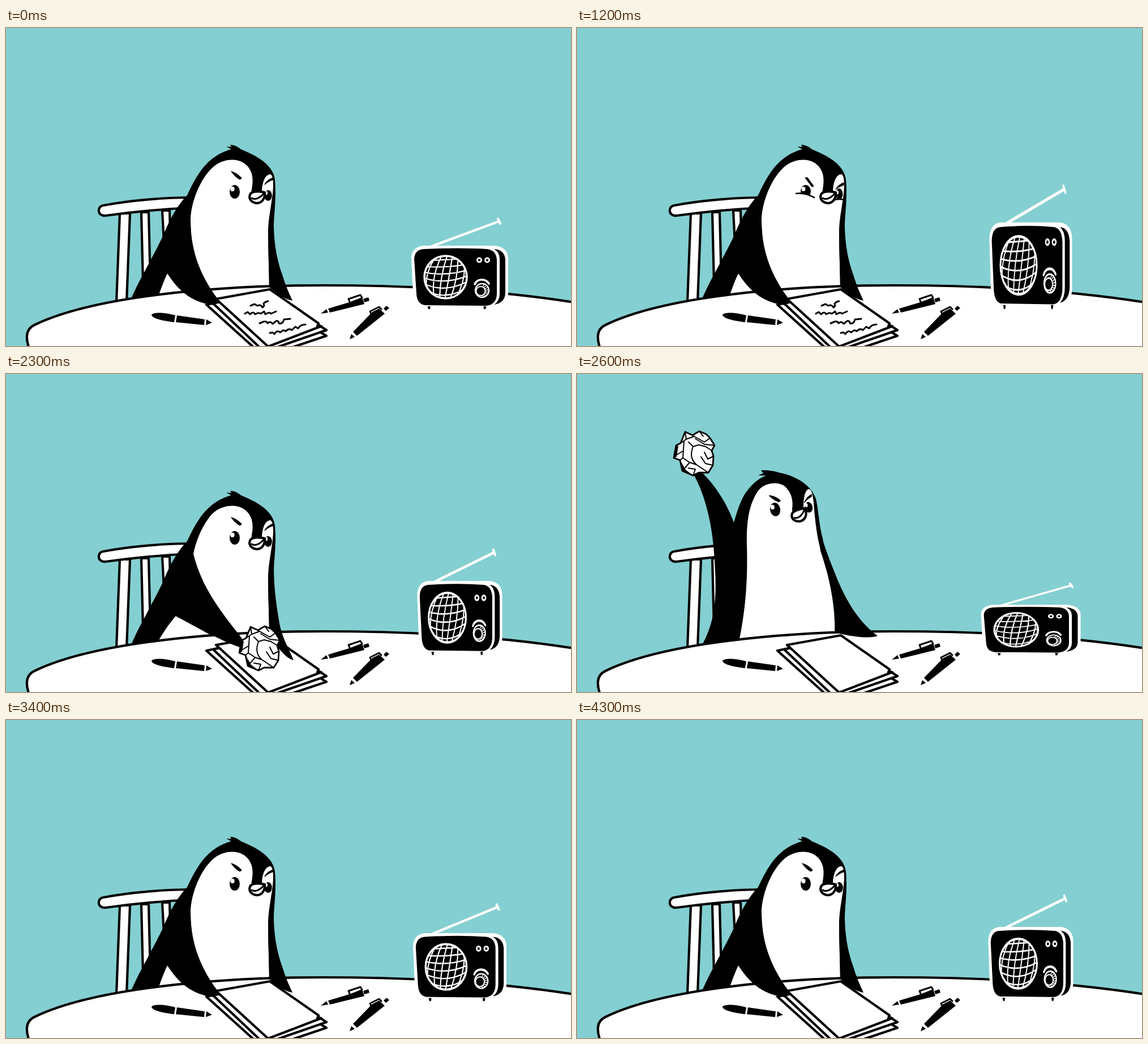
An HTML page for the animation above (4.4 s loop, 998 by 561 pixels).

```html
<!DOCTYPE html>
<html lang="en">
<head>
<meta charset="utf-8">
<title>Penguin at the table</title>
<style>
html, body { margin: 0; width: 100%; height: 100%; overflow: hidden; background: #84cfd1; }
svg { display: block; width: 100%; height: 100%; stroke-width: 4.2px; }
.line { fill: none; stroke: #000; stroke-linecap: round; stroke-linejoin: round; }
.sheet { fill: #fff; stroke: #000; stroke-linejoin: round; }
.white { fill: none; stroke: #fff; stroke-linecap: round; }
.brow { stroke: #000; stroke-width: 1.2px; stroke-linejoin: round; }
</style>
</head>
<body>
<svg viewBox="0 0 998 561">
  <defs>
    <clipPath id="speaker"><circle r="37"/></clipPath>
  </defs>
  <rect width="998" height="561" fill="#84cfd1"/>

  <g class="sheet">
    <path d="M276 322L280 400H291L289 322Z"/>
    <path d="M239 325L242 450H255L252 325Z"/>
    <path d="M201 327L195 484H213L219 327Z"/>
    <path d="M172 313C220 304 280 299 330 299V317C280 319 220 325 176 331C160 332 161 314 172 313Z"/>
  </g>

  <path id="body"/>
  <path id="gap" fill="#fff"/>
  <path id="belly" fill="#fff"/>
  <path id="arm"/>
  <g id="eyes">
    <g id="open">
      <ellipse cx="404" cy="289" rx="9" ry="12"/>
      <ellipse cx="400" cy="284" rx="3.6" ry="4.2" fill="#fff"/>
      <ellipse cx="463" cy="295.500" rx="6.800" ry="9.500"/>
      <ellipse cx="459.500" cy="291" rx="2.600" ry="3.600" fill="#fff"/>
      <path id="brows" class="brow" d="M398 253Q408 256 416 265L413 267Q405 263 398 253ZM457 276Q462 267 472 264L471 268Q464 270 457 276Z"/>
    </g>
    <g id="squint">
      <ellipse cx="404" cy="288" rx="9" ry="11"/>
      <ellipse cx="400" cy="284" rx="3.400" ry="4" fill="#fff"/>
      <ellipse cx="463" cy="293" rx="6.500" ry="10"/>
      <ellipse cx="459.500" cy="290" rx="2.600" ry="3.400" fill="#fff"/>
      <path d="M387 292Q403 290 419 299L414 308H388Z" fill="#fff"/>
      <path d="M456 302Q464 301 470 302L468 308H456Z" fill="#fff"/>
      <path class="line" stroke-width="2.6" d="M387 292Q403 290 419 299M456 303Q464 301 471 303"/>
      <path class="brow" d="M403 264L407 264L418 279L415 280ZM457 284Q463 276 471 273L471 277Q463 280 457 284Z"/>
    </g>
  </g>
  <g id="beak">
    <path d="M431 294C433 288 446 287 457 290C458 299 453 309 443 309C434 308 428 302 431 294Z" class="sheet"/>
    <path class="line" stroke-width="3" d="M434 300C440 304 449 300 456 291"/>
  </g>

  <path class="sheet" d="M42 568C34 548 34 532 50 524C150 475 360 454 560 454C740 454 890 466 1004 484V570Z"/>
  <path d="M257 506C262 500 285 503 299 507L297 519C280 517 258 513 257 506ZM302 507L351 514L350 524L300 519ZM354 514L364 520L353 524Z"/>
  <g id="pens">
    <path d="M556 504L566 496L569 502ZM569 495L606 484L629 475L633 487L572 502ZM631 478L640 475L642 481L633 484Z"/>
    <path class="line" stroke-width="3" d="M607 483L605 478L626 471L629 476"/>
    <path d="M607 549L610 540L616 545ZM613 536L647 501L659 495L669 504L620 543ZM667 495L672 490L677 494L671 499Z"/>
    <path class="line" stroke-width="3" d="M645 505L643 500L659 492L663 496"/>
  </g>

  <g class="sheet">
    <path d="M354 488L440 470L566 543L456 580Z"/>
    <path d="M366 486L460 463L566 533L456 571Z"/>
    <path d="M371 478L466 461L552 521L550 526L557 526L463 562Z"/>
  </g>
  <path id="writing" class="line" stroke-width="3" d="M432 490L439 487L444 490Q450 487 453 493Q457 491 455 486Q459 482 463 482M422 504L427 501L431 505Q437 499 440 505Q446 501 450 504L456 500L458 505Q466 500 468 504L477 500M448 521L455 518Q461 517 462 521Q467 516 471 522L477 517Q482 516 482 521Q489 523 491 514Q496 514 502 513M466 538L471 537L474 540Q479 532 484 537L490 533L494 535Q500 529 505 533L511 527L516 530Q520 523 529 523"/>
  <path id="left"/>
  <path id="right"/>

  <g id="crumple">
    <path class="sheet" stroke-width="3" d="M410 454L425 459L437 447L453 459L472 442L477 457L494 460L487 473L497 478L478 493L485 513L466 518L455 506L432 513L411 531L414 512L388 497L412 488L425 480Z"/>
    <path class="line" stroke-width="2.2" d="M410 454L438 476L437 447L450 471L472 442L465 474L494 460M425 459L430 484L388 497M497 478L463 476L452 488L432 484L411 531M452 488L466 518M478 493L458 493L485 513M414 512L438 494L432 513M455 478L458 462M443 494L455 506M426 490L402 494M438 476L448 481M470 489L474 478"/>
  </g>
  <g id="ball">
    <path class="sheet" stroke-width="2.8" d="M-16 -38L-3 -32L9 -39L21 -34L28 -27L36 -14L31 -5L34 5L33 21L25 34L8 34L-2 39L-21 31L-25 12L-36 8L-32 -14L-24 -18Z"/>
    <path class="line" stroke-width="2" d="M-16 -38L-14 -25L-24 -18L-18 -22L-20 8L-25 12M-14 -25L0 -30L-3 -32M0 -30L18 -20L28 -27M2 -26L18 -16L36 -14M-2 -12Q-10 8 4 20L25 34M-10 -20L-2 -12L8 -15M31 -5L20 -12L8 -15M4 20L-8 16L-21 31M-8 16L-20 8M18 -2L24 10L34 5M12 6L20 18L33 21M-2 39L2 28L-10 26M-30 2L-20 -4M9 -39L16 -30"/>
    <path d="M-36 8L-32 -14L-28 -13L-31 6ZM-25 12L-21 31L-2 39L-15 29Z"/>
  </g>

  <g id="radio">
    <path class="white" stroke-width="4.2" d="M752 385L871 341M869 337L873 345"/>
    <path d="M744 489h6l-1 7h-3ZM843 489h6l-2 7h-3Z"/>
    <path fill="#fff" d="M738 384H862Q886 386 887 405V470Q886 488 866 491H740Q720 489 719 469L716 405Q717 386 738 384Z"/>
    <path d="M738 390Q800 387 850 390Q866 392 867 409V468Q867 488 848 490L740 489Q726 487 725 469L721 407Q722 391 738 390ZM862 390Q880 391 882 408V468Q881 485 862 488Q872 482 872 468V408Q872 395 862 390Z"/>
    <g transform="translate(776.5 439.5)">
      <path id="grid" class="white" stroke-width="2.2" clip-path="url(#speaker)"/>
      <circle class="white" r="37.500" stroke-width="3.500"/>
    </g>
    <circle class="white" cx="836" cy="409.500" r="3.600" stroke-width="2.800"/>
    <circle class="white" cx="850" cy="409.500" r="3.600" stroke-width="2.800"/>
    <path class="white" stroke-width="3.600" d="M828 452C832 442 847 441 853 451"/>
    <circle class="white" cx="841" cy="463" r="12" stroke-width="2.4"/>
    <circle class="white" cx="838.500" cy="464" r="8" stroke-width="2"/>
    <path id="knob" class="white" stroke-width="1.400"/>
  </g>
</svg>
<script>
const $ = id => document.getElementById(id);
const draw = (id, d) => $(id).setAttribute('d', d);
const move = (id, t) => $(id).setAttribute('transform', t);
const show = (id, on) => $(id).style.display = on ? '' : 'none';

// Blend two paths that share the same commands.
function mix(a, b, k) {
  const to = b.match(/-?[\d.]+/g);
  let i = 0;
  return a.replace(/-?[\d.]+/g, n => +n + (to[i++] - n) * k);
}

const sit = {
  body: 'M221 478C232 450 262 400 278 365C290 335 305 310 320 295C335 262 355 225 398 214L389 209L398 210L396 206C404 206 410 210 415 214C450 228 472 244 475 268C478 300 473 330 473 350L465 480Z',
  belly: 'M368 478C336 430 326 385 326 340C326 312 340 270 364 247C380 231 405 229 418 237C434 246 437 262 435 278L433 292L452 290C452 272 458 258 467 258C473 260 473 280 470 300C467 322 463 340 463 360C463 395 465 430 465 475Z',
  right: 'M473 335C472 385 481 415 488 435C494 455 500 468 506 481C490 478 475 466 465 457C465 430 463 395 463 355Z',
  left: 'M300 330L326 338C326 385 338 430 374 478L367 489C335 485 308 470 285 433L270 420Z',
  gap: 'M268 476C274 460 279 445 285 433L340 476Z'
};
const reach = {
  belly: sit.belly.replace('M368 478C336 430 326 385 326 340C326 312 340 270', 'M415 475C385 435 345 375 331 318C334 300 345 268'),
  right: 'M473 335C473 380 478 410 484 445C490 470 500 485 508 505C490 500 475 475 465 457C465 430 463 395 463 355Z',
  left: 'M300 330L331 318C345 375 380 420 412 460L430 486C395 481 345 449 300 427L285 420Z',
  gap: 'M266 476C275 460 288 440 300 427L390 476Z'
};
const rise = {
  body: 'M221 478C250 430 262 320 277 262C285 235 292 215 303 203C312 192 320 185 334 179L320 179L329 175L325 170C335 169 348 171 357 174C390 180 414 198 422 220C427 242 427 265 434 290L456 480Z',
  belly: 'M285 478C297 420 302 370 300 300C299 265 303 230 320 206C332 190 357 190 367 198C380 210 382 225 380 238L381 252L400 240C400 220 402 204 410 203C417 206 418 225 420 250C423 280 427 300 433 320C447 365 457 410 456 478Z',
  right: 'M424 245C429 285 442 318 455 350C469 386 492 434 531 462C515 468 475 462 455 455C457 420 449 365 430 312Z'
};
const arms = {
  lift: 'M221 478C245 430 248 395 238 360C225 330 210 310 190 292L200 283C235 290 270 300 303 320L315 360L300 478Z',
  up: 'M221 478C248 430 246 380 243 330C240 265 225 208 204 174L221 174C246 198 266 232 277 262L292 300L286 478Z',
  back: 'M221 478C248 430 246 380 241 330C232 260 208 200 178 156L194 152C235 190 262 225 277 262L292 300L286 478Z',
  toss: 'M221 478C250 420 262 340 277 285C310 255 390 260 452 232L460 246C425 300 360 350 300 370L286 478Z',
  follow: 'M221 478C250 420 262 350 280 300C320 305 410 350 462 398L455 408C400 412 340 405 298 395L286 478Z'
};
const squash = [[1, 1], [1.03, .796], [.855, 1.363], [.878, 1.168], [.965, 1.071]];

// Arm, body rise and ball position on each step of the throw.
const throwSteps = {
  25: ['lift', .5, 188, 262],
  26: ['up', 1, 207, 140],
  27: ['back', 1, 182, 121],
  28: ['toss', 1, 478, 222],
  29: ['follow', 1, 700, 168],
  30: ['follow', 1, 905, 138],
  31: ['follow', .5, 1010, 150]
};

function render(ms) {
  const step = Math.floor(ms % 4400 / 100);
  const [sx, sy] = squash[step % 5];
  move('radio', `translate(801 497) scale(${sx} ${sy}) translate(-801 -497)`);

  const [arm, up, bx, by] = throwSteps[step] || ['', 0, 448, 484];
  const lean = step < 25 ? Math.min(1, Math.max(0, (step - 12) / 3)) : 0;
  const pose = name => arm ? mix(sit[name], rise[name], up) : mix(sit[name], reach[name], lean);
  draw('body', mix(sit.body, rise.body, up));
  draw('belly', pose('belly'));
  draw('right', pose('right'));
  draw('arm', arm ? arms[arm] : '');
  draw('left', arm ? '' : pose('left'));
  draw('gap', arm ? '' : pose('gap'));

  const squint = step >= 9 && step < 23;
  show('open', !squint);
  show('squint', squint);
  move('eyes', `translate(${-54 * up} ${-50 * up}) rotate(${-10 * up} 404 289)`);
  move('brows', `translate(0 ${10 * up})`);
  move('beak', `translate(${-51 * up} ${-49 * up}) rotate(${-18 * up} 443 298)`);

  show('writing', step < 16);
  show('crumple', step >= 16 && step < 22);
  const size = 1 + (19 - step) * .08;
  move('crumple', `translate(445 487) scale(${size}) translate(-445 -487)`);
  show('ball', step >= 22 && step < 32);
  move('ball', `translate(${bx} ${by}) rotate(${step > 27 ? (step - 27) * 70 : 0})`);
}

let grid = '', knob = '';
for (let k = -2.5; k <= 2.5; k++) {
  grid += `M${k * 9 + 8} -40Q${k * 17 - 2} 0 ${k * 9 - 6} 40`;
  grid += `M-40 ${k * 10 - 4}Q0 ${k * 15 + 7} 40 ${k * 10 - 8}`;
}
draw('grid', grid);
for (let a = -1.2; a < 1.5; a += .35) {
  const x = Math.cos(a), y = Math.sin(a);
  knob += `M${839 + 8 * x} ${464 + 8 * y}L${841 + 12 * x} ${463 + 12 * y}`;
}
draw('knob', knob);

const start = performance.now();
function tick() {
  render(performance.now() - start);
  requestAnimationFrame(tick);
}
tick();
</script>
</body>
</html>
```
